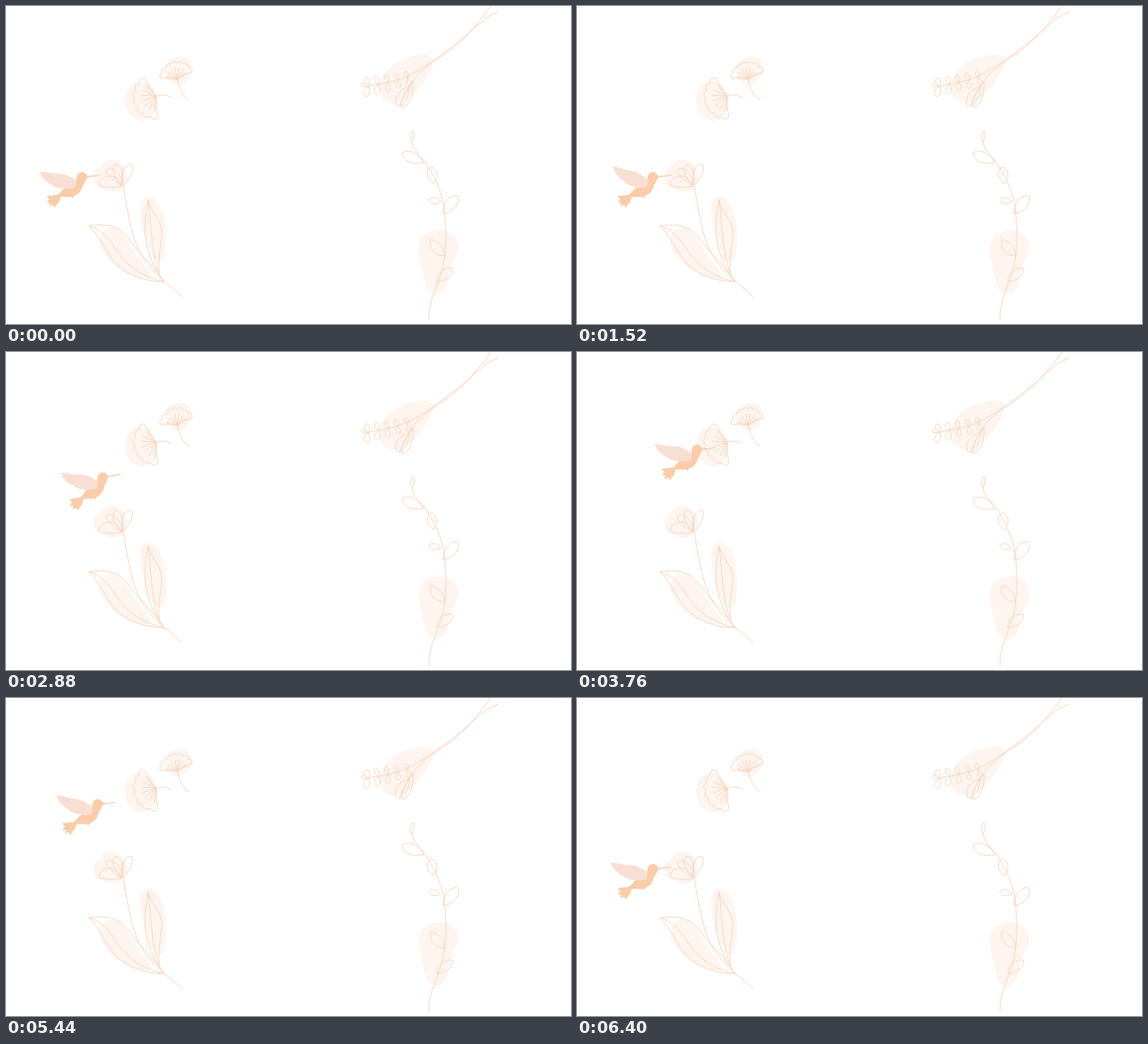
Animation of 640x360 px, one loop 6480 ms. Source, as an HTML page:

```html
<!DOCTYPE html>
<html lang="en">
<head>
<meta charset="utf-8">
<title>Hummingbird and flowers</title>
<style>
  html, body { margin: 0; width: 100%; height: 100%; overflow: hidden; background: #fff; }
  svg { display: block; width: 100%; height: 100%; }
  .blobs { fill: #fef5f0; }
  .lines { fill: none; stroke: #f8d5bf; stroke-width: .9; stroke-linecap: round; stroke-linejoin: round; }
  .body { fill: #fbcca9; }
  .wing { fill: #f8dfd4; }
</style>
</head>
<body>
<svg viewBox="0 0 640 360">
  <path fill="#fcfcfc" d="M556 0H640V3H556Z"/>
  <g class="blobs">
    <path d="M99 193C98 186 106 184 109 178C114 172 126 173 131 179C138 185 140 200 133 206C127 211 117 212 109 206C103 205 99 200 99 193Z"/>
    <path d="M152 229C152 219 158 214 166 217C177 223 182 245 181 264C181 281 179 291 173 290C162 288 152 250 152 229Z"/>
    <path d="M106 262C112 247 126 246 136 263C145 279 159 295 166 307C155 312 131 303 119 290C111 282 104 271 106 262Z"/>
    <path d="M135 107C135 93 143 85 153 85C164 86 171 95 171 108C171 121 164 130 154 130C143 129 135 120 135 107Z"/>
    <path d="M180 71C182 61 193 56 202 58C210 60 213 71 208 79C203 89 193 92 187 86C182 82 179 77 180 71Z"/>
    <path d="M429 76C437 63 461 54 476 55C485 56 486 63 482 71C476 84 463 101 451 108C440 114 427 109 424 98C422 90 425 82 429 76Z"/>
    <path d="M468 277C467 262 477 254 490 254C503 254 512 262 512 273C511 286 503 291 502 303C501 317 495 326 486 326C477 325 474 312 472 300C470 292 468 285 468 277Z"/>
  </g>
  <g class="lines">
    <!-- tulip -->
    <path d="M133 204C137 229 141 255 150 276C158 292 170 304 179 312C186 317 192 322 199 329"/>
    <path d="M131 204C123 206 109 206 105 202C106 194 116 191 122 193C127 196 130 200 131 204C121 197 113 190 113 186C117 181 126 186 130 194C133 199 133 202 131 204C121 193 119 182 124 179C131 180 135 192 131 204C130 187 134 180 141 179C147 181 141 197 131 204"/>
    <path d="M179 312C166 292 147 276 137 261C127 248 111 246 94 249C108 263 111 275 122 289C136 305 158 312 179 312C148 305 134 290 125 276C116 261 106 252 94 249"/>
    <path d="M161 220C155 246 157 269 163 283C167 293 170 300 174 305C170 280 180 263 175 247C170 237 164 231 161 220C164 240 164 278 174 305L179 312"/>
    <!-- ginkgo stems -->
    <path d="M187 104C181 99 177 101 170 102M207 106C200 103 196 92 194 83"/>
    <!-- sprig -->
    <path d="M557 7C539 13 524 33 508 44C491 57 471 72 457 78C442 86 424 88 408 91M549 0C536 19 522 34 507 47C489 61 471 70 462 83C456 92 450 101 446 114"/>
    <path d="M457 92C446 92 439 104 442 112C450 116 456 104 457 92M461 86C462 98 458 113 449 115C446 107 453 96 461 86"/>
    <!-- vine -->
    <path d="M460 153C460 164 471 170 477 180C488 198 496 216 497 236C499 258 499 277 494 299C489 319 479 330 479 355"/>
    <path d="M460 153C456 149 459 143 461 141C463 144 463 149 460 153M473 177C459 181 449 175 449 166C457 161 468 167 473 177M484 201C476 196 475 185 482 182C490 185 490 196 484 201M492 222C485 226 479 223 479 219C483 215 490 217 492 222M495 235C495 221 504 213 512 215C515 223 507 234 495 235M497 283C485 283 479 274 481 264C491 267 497 275 497 283M488 312C488 301 498 295 506 297C506 307 498 311 488 312"/>
    <path id="sprigLeaves"/>
    <path id="ginkgos"/>
  </g>
  <g id="bird">
    <path class="body" d="M106.500 191L92 192.500C90 187 84 186.500 81 190.500C79 194 81 198 76 201L65 207C63 210 61 212 58 214L46 215L49 219L46 222L50 223L49 227L53 225L55 228.500L58 224L60 222L62 216L74 216L75.500 218L77 215C83 213 86 208 87 203C90 200 90 197 92 194L106.500 191.900Z"/>
    <path id="wing" class="wing" d="M80 198C73 192 65 189 55 189.500C49 189 43 187 37 188L40 191L39 192L43 195L42 196L47 199L47 200L52 202L54 204C61 207 72 208 79 205Z"/>
  </g>
</svg>
<script>
const LOOP = 6480, STEP = 80, BEATS = 14;
const $ = id => document.getElementById(id);

const polar = (x, y, degrees, r) => {
  const a = degrees * Math.PI / 180;
  return [x + r * Math.cos(a), y + r * Math.sin(a)];
};

// A fan of ribs with a scalloped rim, open between two angles.
function ginkgo(x, y, from, to, radius, lobes = 7) {
  const step = (to - from) / lobes;
  let rim = `M${x} ${y}Q${polar(x, y, from + 10, radius / 2)} ${polar(x, y, from, radius)}`;
  let ribs = '';
  for (let i = 1; i <= lobes; i++) {
    const angle = from + step * i;
    rim += `Q${polar(x, y, angle - step / 2, radius * 1.22)} ${polar(x, y, angle, radius)}`;
    ribs += `M${x} ${y}L${polar(x, y, angle - step / 2, radius * .7)}`;
  }
  return `${rim}Q${polar(x, y, to - 10, radius / 2)} ${x} ${y}${ribs}`;
}

function leaf(x, y, angle, length) {
  const point = (turn, r) => polar(x, y, angle + turn, length * r);
  return `M${x} ${y}C${point(-40, .5)} ${point(-26, 1)} ${point(0, 1)}`
    + `C${point(26, 1)} ${point(40, .5)} ${x} ${y}`;
}

let sprig = leaf(409, 91, 200, 7);
for (let i = 0; i < 5; i++) {
  const x = 411 + 11 * i, y = 91 - 2.3 * i;
  sprig += leaf(x, y, 250, 10 - i / 2) + leaf(x, y, 110 - 8 * i, 12 - i);
}
$('sprigLeaves').setAttribute('d', sprig);
$('ginkgos').setAttribute('d', ginkgo(170, 102, 85, 238, 24) + ginkgo(194, 83, 183, 333, 18.5));

const progress = (t, start, end) => Math.min(1, Math.max(0, (t - start) / (end - start)));
const ease = u => u * u * u * (u * (u * 6 - 15) + 10);
const arc = u => Math.sin(Math.PI * u);

function draw() {
  const t = Math.floor(performance.now() % LOOP / STEP) * STEP;
  const out = progress(t, 1840, 3700), back = progress(t, 5100, 6400);
  const away = ease(out) - ease(back);
  const x = 50 * away - 6 * arc(out) - 36 * arc(back);
  const y = -83 * away;
  const lift = Math.sin(Math.PI * BEATS * t / LOOP) ** 4;
  $('bird').setAttribute('transform', `translate(${x} ${y}) rotate(${-5 * arc(out)} 75 205)`);
  $('wing').setAttribute('transform', `rotate(${lift * 25} 79 203)`);
  requestAnimationFrame(draw);
}
draw();
</script>
</body>
</html>
```
